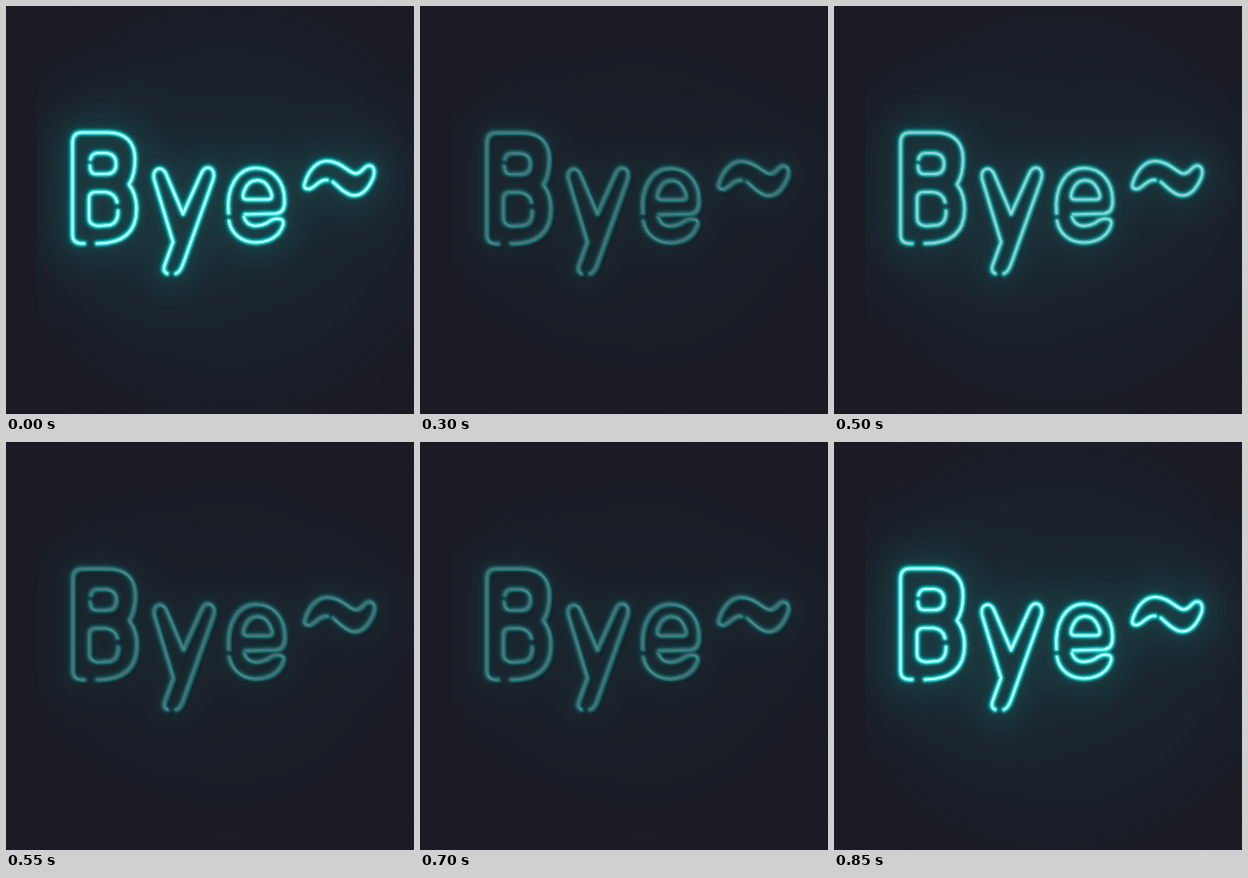
Animation of 408x408 px, one loop 900 ms. Source, as an HTML page:

```html
<!DOCTYPE html>
<html lang="en">
<head>
<meta charset="utf-8">
<title>Neon sign</title>
<style>
  html, body { margin: 0; width: 100%; height: 100%; overflow: hidden; background: #1b1b25; }
  svg { display: block; width: 100vw; height: 100vh; }
  use { fill: none; stroke-linecap: round; stroke-linejoin: round; }
  .shadow { stroke: #14151c; stroke-width: 3.6; opacity: .8; filter: blur(.9px); }
  .glass { stroke: #0d4346; stroke-width: 2.5; filter: blur(.45px); }
  .room { stroke: #1c5c5e; stroke-width: 90; opacity: .12; filter: blur(34px); }
  .halo { stroke: #1c6a68; stroke-width: 40; opacity: .2; filter: blur(12px); }
  .near { stroke: #159a9a; stroke-width: 9; opacity: .24; filter: blur(4px); }
  .edge { stroke: #0cbcbe; stroke-width: 6.6; opacity: .85; filter: blur(1px); }
  .tube { stroke: #22dedb; stroke-width: 4.4; filter: blur(.3px); }
  .core { stroke: #c4fffb; stroke-width: 2.2; filter: blur(.45px); }
</style>
</head>
<body>
<svg viewBox="0 0 408 408" role="img" aria-label="Bye~">
  <defs>
    <clipPath id="wall"><rect x="31" width="377" height="408"/></clipPath>
    <radialGradient id="air">
      <stop offset="0" stop-color="#1a323a" stop-opacity=".4"/>
      <stop offset=".6" stop-color="#1a2e38" stop-opacity=".36"/>
      <stop offset="1" stop-color="#1b2530" stop-opacity="0"/>
    </radialGradient>
    <g id="sign">
      <!-- B -->
      <path d="M78 237.500H75Q66.500 237 66.500 229V137Q66.500 126.500 76 126.500H102C120 126.500 129 137 129 153C129 165 127 172 123 178.500C128 185 130.500 193 130.500 203C130.500 226 117 237.500 91 237.500"/>
      <path d="M84.500 153Q86 147 92 147H100Q110 148 110 158Q110 168 100 168H90Q84 168 84 160"/>
      <path d="M112 205Q112 217 104 219L92 220Q83 219 83 212V193Q83 186 90 186H99Q109 187 111 196"/>
      <!-- y -->
      <path d="M161 267.500Q156 265 159 258L167 236L148 173C146 162 156 159 160 168L177 208L195 168C199 157 211 161 207 174L177 258Q174 266 170 267.500"/>
      <!-- e -->
      <path d="M222.500 207C220 181 232 162 250 162C268 162 278.500 177 278.500 194Q279 207 270 207.500L239 208.500"/>
      <path d="M238 211C241 222 253 221 261 217C266 213 270 212 274 213C280 214 277 222 272 228C266 234 258 236.500 250 236.500C235 236.500 225 227 223 215"/>
      <path d="M241 193.500C235 193.500 237 187 239 183C244 172 257 171 263 182C267 190 267 193.500 261 193.500Z"/>
      <!-- ~ -->
      <path d="M321 174C313 173 309 182 303 183C297 183 298 179 299 176C303 164 311 155 321 155C336 155 343 168 350 167.500C357 167 357 160 363 159.500C369 160 369 167 367 172C361 186 354 191 345 189C336 186 332 180 327 176"/>
    </g>
  </defs>
  <rect width="408" height="408" fill="#1b1b25"/>
  <use href="#sign" class="shadow" x="3.500" y="5"/>
  <use href="#sign" class="glass" x="2" y="1.500"/>
  <g id="light">
    <g clip-path="url(#wall)">
      <ellipse cx="222" cy="202" rx="265" ry="250" fill="url(#air)"/>
      <use href="#sign" class="room"/>
      <use href="#sign" class="halo"/>
      <use href="#sign" class="near"/>
    </g>
    <use href="#sign" class="edge"/>
    <use href="#sign" class="tube"/>
    <use href="#sign" class="core"/>
  </g>
</svg>
<script>
  const LOOP = 900;
  const FULL = 1, HIGH = .78, MID = .58, LOW = .36, OFF = 0;

  // [time in ms, brightness]; each level holds until the next one
  const flicker = [
    [0, FULL], [150, OFF],
    [300, LOW], [350, MID], [400, HIGH],
    [450, LOW], [500, HIGH], [550, LOW], [600, HIGH],
    [650, MID], [700, LOW], [750, MID], [800, HIGH],
    [850, FULL], [LOOP, FULL]
  ];

  document.getElementById('light').animate(
    flicker.map(([time, opacity]) => ({ offset: time / LOOP, opacity, easing: 'steps(1, end)' })),
    { duration: LOOP, iterations: Infinity }
  );
</script>
</body>
</html>
```
